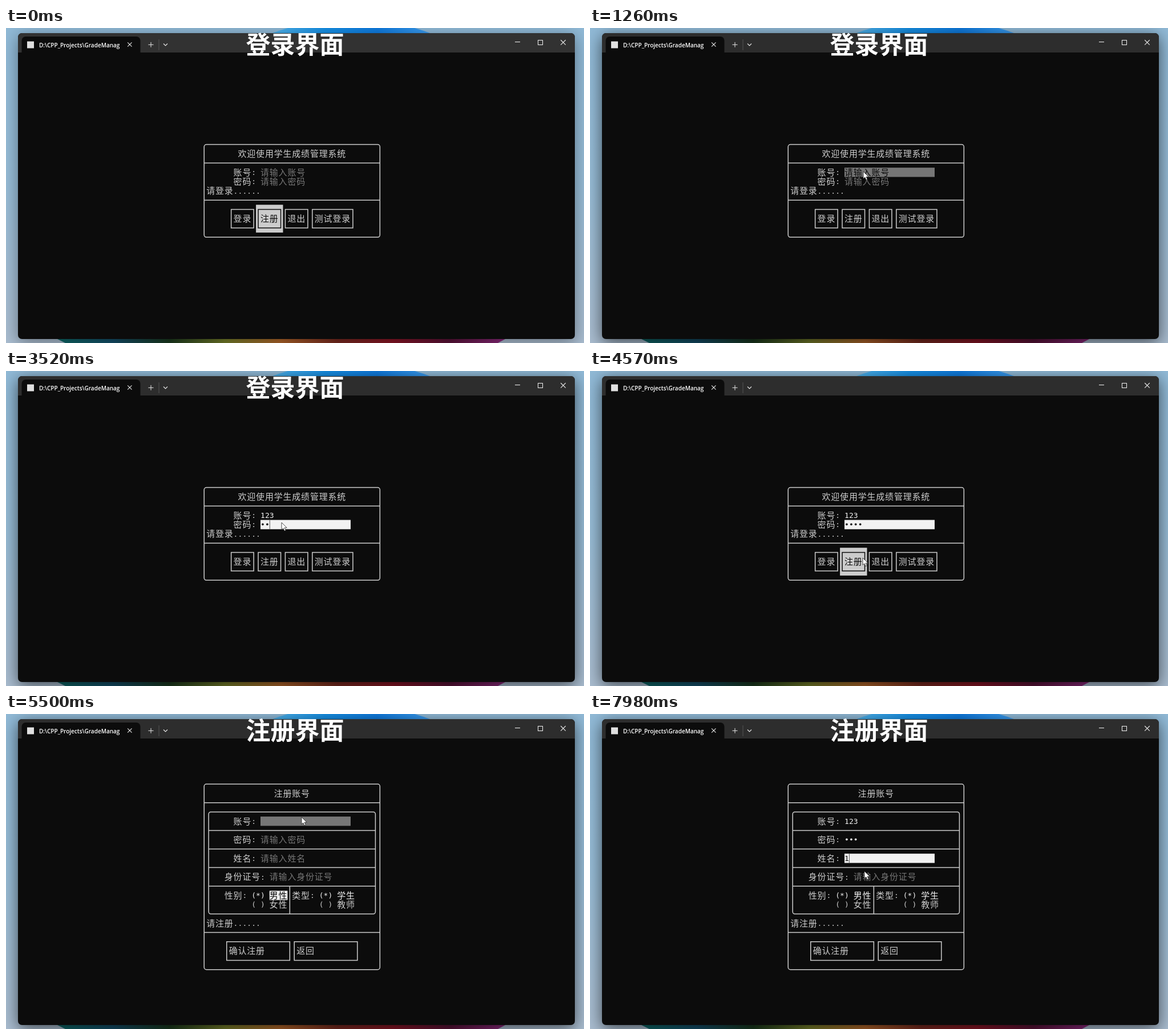
Write an HTML page with a canvas that moves like this. It is 1013x553 px and loops after 8000 ms.

```html
<!DOCTYPE html>
<html lang="zh-CN">
<head>
<meta charset="utf-8">
<style>
html, body { margin: 0; width: 100%; height: 100%; overflow: hidden; background: #93b5cf; }
canvas { display: block; }
</style>
</head>
<body>
<canvas id="stage" width="1013" height="553"></canvas>
<script>
const g = document.getElementById('stage').getContext('2d');
const LOOP = 8000, W = 1013, H = 553;
const ACTIVE = 1170, SWITCH = 4780; // window gets focus, second screen opens
const CELL = 7.9, ROW = 16.28;
const BG = '#0c0c0c', FG = '#cccccc', DIM = '#767676', BRIGHT = '#f2f2f2', ICON = '#e8e8e8';
const CJK = '"Noto Sans CJK SC", "Noto Sans CJK", sans-serif';
const MONO = '"DejaVu Sans Mono", monospace';

// Terminal grid: left edge of a column, middle of a row
const colX = c => 343.3 + CELL * c;
const rowY = r => 123.1 + ROW * r;
const ramp = (t, a, b) => Math.max(0, Math.min(1, (t - a) / (b - a)));
const ease = k => k * k * (3 - 2 * k);

// The mouse enters at the lower right, then makes these eased moves
const ENTRY = { x: 958, y: 546 };
const MOVES = [
  { from: 230, to: 1000, x: 479, y: 252 },
  { from: 2580, to: 2760, x: 483, y: 266 },
  { from: 4000, to: 4420, x: 478, y: 328 },
  { from: 4900, to: 5460, x: 518, y: 181 },
  { from: 5900, to: 6540, x: 509, y: 220 },
  { from: 6900, to: 7040, x: 497, y: 245 },
  { from: 7490, to: 7960, x: 481, y: 276 }
];

// Clicked at one time, typed from another with an even gap between keys
const field = (label, row, value = '', click = Infinity, typing = 0, gap = 0) =>
  ({ label, row, value, click, typing, gap, col: 11 + label.length });
const LOGIN = [
  field('账号', 8, '123', ACTIVE, 2230, 160),
  field('密码', 9, '••••', 2960, 3320, 200)
];
const REGISTER = [
  field('账号', 4, '123', 5770, 6270, 220),
  field('密码', 6, '•••', 6880, 7150, 170),
  field('姓名', 8, '1', 7660, 7900, 100),
  field('身份证号', 10)
];

function mouseAt(t) {
  if (t < MOVES[0].from) return null;
  let { x, y } = ENTRY;
  for (const m of MOVES) {
    const k = ease(ramp(t, m.from, m.to));
    x += (m.x - x) * k;
    y += (m.y - y) * k;
  }
  return { x, y };
}

function path(points) {
  g.beginPath();
  for (let i = 0; i < points.length; i += 2) g.lineTo(points[i], points[i + 1]);
}

function line(color, width, ...points) {
  g.strokeStyle = color;
  g.lineWidth = width;
  path(points);
  g.stroke();
}

function poly(color, ...points) {
  g.fillStyle = color;
  path(points);
  g.closePath();
  g.fill();
}

function panel(color, x, y, w, h, r) {
  g.fillStyle = color;
  g.beginPath();
  g.roundRect(x, y, w, h, r);
  g.fill();
}

function gradient(x0, y0, x1, y1, colors) {
  const fill = g.createLinearGradient(x0, y0, x1, y1);
  colors.forEach((c, i) => fill.addColorStop(i / (colors.length - 1), c));
  return fill;
}

function text(c, r, str, color = FG) {
  g.fillStyle = color;
  for (const ch of str) {
    const wide = ch > '\u2fff';
    g.font = wide ? '15px ' + CJK : '13px ' + MONO;
    g.fillText(ch, colX(c), rowY(r) + (wide ? 5.3 : 4.7));
    c += wide ? 2 : 1;
  }
}

function cells(c, r, w, h, color) {
  g.fillStyle = color;
  g.fillRect(colX(c), rowY(r) - ROW / 2, CELL * w, ROW * h);
}

function box(c0, r0, c1, r1, radius = 0, color = FG) {
  g.strokeStyle = color;
  g.lineWidth = 1.5;
  g.beginPath();
  g.roundRect(colX(c0 + 0.5), rowY(r0), CELL * (c1 - c0), rowY(r1) - rowY(r0), radius);
  g.stroke();
}

function rule(c0, c1, r) {
  line(FG, 1.5, colX(c0 + 0.5), rowY(r), colX(c1 + 0.5), rowY(r));
}

function buttons(c, r, labels, isLit, minWidth = 0) {
  for (const label of labels) {
    const w = Math.max(minWidth, label.length * 2 + 2);
    const lit = isLit(label, c, w);
    if (lit) cells(c, r, w, 3, FG);
    box(c, r, c + w - 1, r + 2, 0, lit ? BG : FG);
    text(c + 1, r + 1, label, lit ? BG : FG);
    c += w;
  }
}

function over(mouse, c, r, w, h) {
  if (!mouse) return false;
  const dx = mouse.x - colX(c), dy = mouse.y - rowY(r) + ROW / 2;
  return dx >= 0 && dx < w * CELL && dy >= 0 && dy < h * ROW;
}

function input(t, mouse, f, next) {
  const count = t < f.typing ? 0 : Math.floor((t - f.typing) / f.gap) + 1;
  const value = f.value.slice(0, count);
  const focused = t >= f.click && !(next && t >= next.click);
  const active = focused || (t >= ACTIVE && over(mouse, f.col, f.row, 20, 1));
  text(9 - f.label.length, f.row, f.label + ':');
  if (active) cells(f.col, f.row, 20, 1, value ? BRIGHT : DIM);
  if (value) text(f.col, f.row, value, active ? BG : BRIGHT);
  else if (focused || !active) text(f.col, f.row, '请输入' + f.label, active ? BG : DIM);

  const lastKey = f.typing + (value.length - 1) * f.gap;
  if (focused && value && t - lastKey < 530) {
    const x = colX(f.col + value.length) + 0.5;
    line('#555', 1, x, rowY(f.row) - 8, x, rowY(f.row) + 8);
  }
  // The terminal's own caret blinks in the corner soon after a click
  if (f.click > ACTIVE && t >= f.click + 160 && t < f.click + 200) line(FG, 1, 967.5, 522, 967.5, 539);
}

const inputs = (t, mouse, list) => list.forEach((f, i) => input(t, mouse, f, list[i + 1]));

function login(t, mouse) {
  box(0, 5, 39, 15, 4);
  rule(0, 39, 7);
  rule(0, 39, 11);
  text(8, 6, '欢迎使用学生成绩管理系统');
  text(1, 10, '请登录......');
  inputs(t, mouse, LOGIN);
  buttons(6, 12, ['登录', '注册', '退出', '测试登录'],
    (label, c, w) => t < ACTIVE ? label === '注册' : over(mouse, c, 12, w, 3));
}

function register(t, mouse) {
  box(0, 0, 39, 20, 4);
  rule(0, 39, 2);
  rule(0, 39, 16);
  box(1, 3, 38, 14, 4);
  for (let r = 5; r <= 11; r += 2) rule(1, 38, r);
  line(FG, 1.5, colX(19.5), rowY(11), colX(19.5), rowY(14));
  text(16, 1, '注册账号');
  inputs(t, mouse, REGISTER);
  const picking = t < REGISTER[0].click;
  if (picking) cells(15, 12, 4, 1, BRIGHT);
  text(5, 12, '性别:');
  text(11, 12, '(*)', BRIGHT);
  text(15, 12, '男性', picking ? BG : BRIGHT);
  text(11, 13, '( ) 女性');
  text(20, 12, '类型:');
  text(26, 12, '(*) 学生', BRIGHT);
  text(26, 13, '( ) 教师');
  text(1, 15, '请注册......');
  buttons(5, 17, ['确认注册', '返回'], () => false, 15);
}

function desktop() {
  g.fillStyle = gradient(0, 0, 0, H, ['#90b9d6', '#97bcd6', '#a9bccf']);
  g.fillRect(0, 0, W, H);
  g.fillStyle = gradient(468, 0, 742, 0, ['#4fb4ee', '#1690e6', '#0f7be0', '#3a9cf0']);
  g.beginPath();
  g.ellipse(605, 69, 200, 83, 0, 0, 7);
  g.fill();
  poly(gradient(90, 0, 875, 0, ['#0d6a68', '#14506c', '#1a3a1e', '#77802a',
    '#b5672a', '#7a2a20', '#8c1526', '#5a1238', '#8f2a80']),
    88, 545, 877, 545, 862, 553, 104, 553);
}

function cross(x, y, s) {
  line(ICON, 1.1, x - s, y - s, x + s, y + s);
  line(ICON, 1.1, x - s, y + s, x + s, y - s);
}

function chrome(active) {
  g.save();
  g.shadowColor = `rgba(0,0,0,${0.4 + 0.2 * active})`;
  g.shadowBlur = 28;
  g.shadowOffsetY = 6;
  panel(BG, 21, 9, 976, 537, 7);
  g.restore();
  const shade = Math.round(50 - 5 * active);
  panel(`rgb(${shade},${shade},${shade})`, 21, 9, 976, 34, [7, 7, 0, 0]);
  panel(BG, 27.5, 15, 208, 28, [7, 7, 0, 0]);
  panel('#e0e0e0', 37, 23.5, 12, 12, 0);
  g.fillStyle = '#fff';
  g.font = '600 10px "Open Sans", "Noto Sans", sans-serif';
  g.fillText('D:\\CPP_Projects\\GradeManag', 58, 33.5);
  cross(216.8, 29, 3.7);
  line(ICON, 1, 249.5, 29.3, 258.5, 29.3);
  line(ICON, 1, 254, 24.8, 254, 33.8);
  line('#555', 1, 268, 20, 268, 39);
  line(ICON, 1.1, 276, 27.5, 279.5, 31, 283, 27.5);
  line(ICON, 1.1, 892, 24.5, 901, 24.5);
  g.strokeRect(932.5, 21.5, 8, 8);
  cross(976.5, 25.3, 4.3);
}

function caption(t) {
  const first = t < SWITCH;
  g.globalAlpha = first ? 1 - ramp(t, 4090, 4560) : ramp(t, SWITCH, 5260);
  g.fillStyle = '#fff';
  g.font = 'bold 43px ' + CJK;
  g.fillText(first ? '登录界面' : '注册界面', 420.5, 45);
  g.globalAlpha = 1;
}

function arrow({ x, y }) {
  g.save();
  g.translate(x, y);
  poly('#fff', 0, 0, 0, 12.6, 2.9, 10, 5, 14.8, 7.2, 13.8, 5.1, 9.2, 9.2, 9.2);
  g.strokeStyle = '#222';
  g.lineWidth = 0.8;
  g.stroke();
  g.restore();
}

function draw(t) {
  const mouse = mouseAt(t);
  desktop();
  chrome(ramp(t, ACTIVE - 40, 1260));
  (t < SWITCH ? login : register)(t, mouse);
  caption(t);
  if (mouse) arrow(mouse);
}

const start = performance.now();
function frame() {
  draw((performance.now() - start) % LOOP);
  requestAnimationFrame(frame);
}
frame();
</script>
</body>
</html>
```
